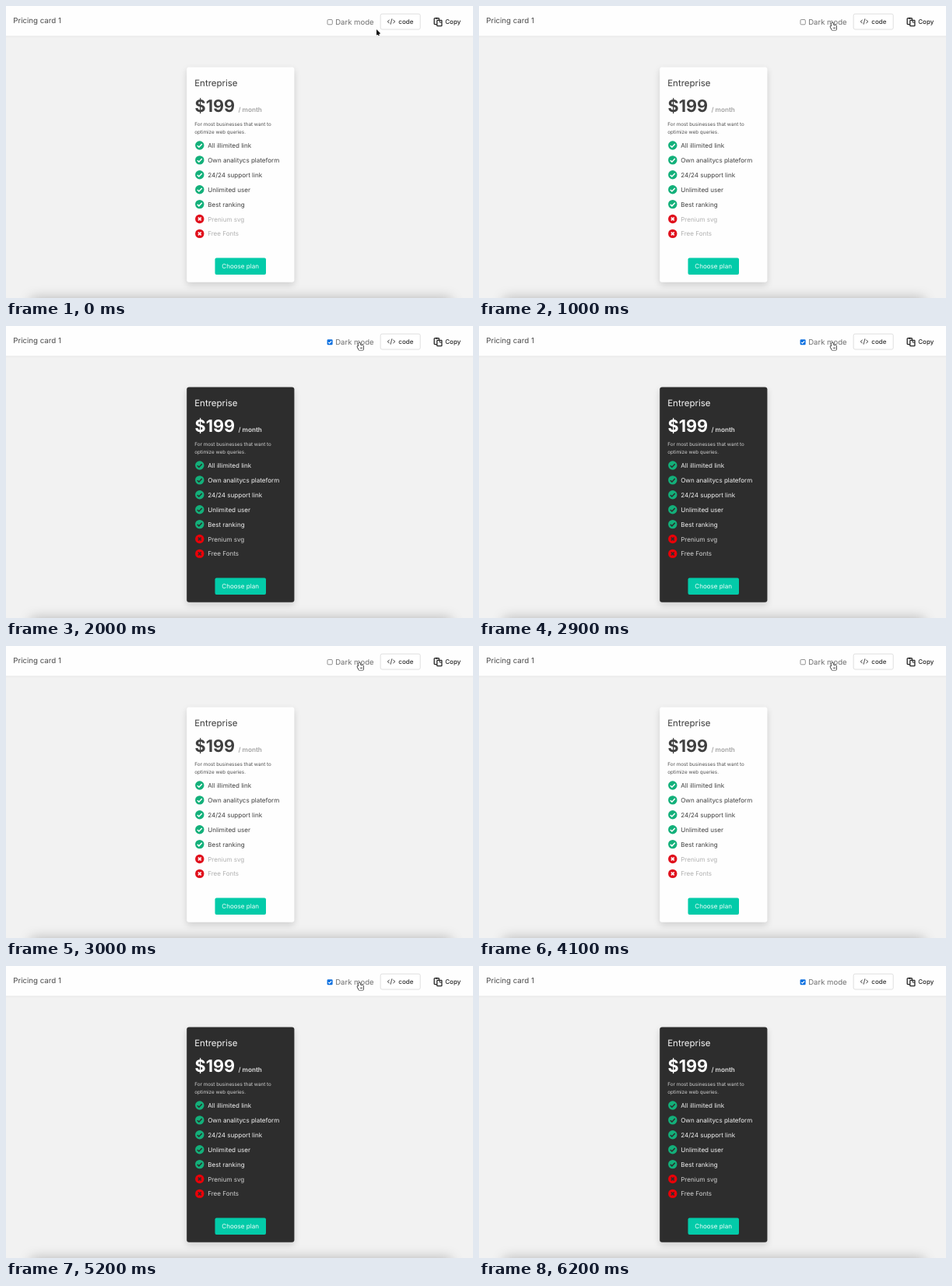
An HTML page with a canvas for the animation above (6.3 s loop, 600x375 px).

```html
<!DOCTYPE html>
<html lang="en">
<head>
<meta charset="utf-8">
<title>Pricing card</title>
<style>
html, body { margin: 0; width: 100%; height: 100%; overflow: hidden; background: #f2f2f2; }
canvas { display: block; width: 600px; height: 375px; }
</style>
</head>
<body>
<canvas id="stage"></canvas>
<script>
const LOOP = 6300, STEP = 100;
const TOGGLES = [1100, 3000, 5200];
const LEAVE = 5500;

const canvas = document.getElementById('stage');
const ctx = canvas.getContext('2d');
const dpr = window.devicePixelRatio || 1;
canvas.width = 600 * dpr;
canvas.height = 375 * dpr;

const light = {
  card: '#fefefe', title: '#3b3b3b', price: '#404040', unit: '#a3a3a3',
  note: '#505050', item: '#404040', off: '#b0b0b0', no: '#e0101c'
};
const dark = {
  card: '#2d2d2d', title: '#f6f6f6', price: '#fff', unit: '#dedede',
  note: '#d0d0d0', item: '#f2f2f2', off: '#d0d0d0', no: '#e90008'
};
const perks = ['All illimited link', 'Own analitycs plateform',
  '24/24 support link', 'Unlimited user', 'Best ranking'];
const missing = ['Prenium svg', 'Free Fonts'];

const ease = u => {
  const k = Math.min(1, Math.max(0, u));
  return k * k * (3 - 2 * k);
};

function text(str, x, y, size, color, weight = 400) {
  ctx.font = `${weight} ${size}px Inter, "Open Sans", sans-serif`;
  ctx.textRendering = 'geometricPrecision';
  ctx.fillStyle = color;
  ctx.fillText(str, x, y);
}

function box(x, y, w, h, r, fill, stroke, width = 0.8) {
  ctx.beginPath();
  ctx.roundRect(x, y, w, h, r);
  ctx.fillStyle = fill;
  ctx.fill();
  if (!stroke) return;
  ctx.strokeStyle = stroke;
  ctx.lineWidth = width;
  ctx.stroke();
}

function line(color, width, ...points) {
  ctx.strokeStyle = color;
  ctx.lineWidth = width;
  ctx.beginPath();
  for (const [x, y] of points) ctx.lineTo(x, y);
  ctx.stroke();
}

// runs a drawing with its own origin and state
function at(x, y, paint) {
  ctx.save();
  ctx.translate(x, y);
  paint();
  ctx.restore();
}

function shadow(color, blur, dy) {
  ctx.shadowColor = color;
  ctx.shadowBlur = blur * dpr;
  ctx.shadowOffsetY = dy * dpr;
}

function tick(x, y, s, color, width) {
  line(color, width, [x - s, y + s * 0.1], [x - s * 0.3, y + s * 0.75], [x + s, y - s * 0.6]);
}

function cross(x, y, s, color, width) {
  for (const d of [-s, s]) line(color, width, [x - s, y - d], [x + s, y + d]);
}

function background() {
  ctx.fillStyle = '#f2f2f2';
  ctx.fillRect(0, 0, 600, 375);
  at(0, 0, () => {
    shadow('rgba(0,0,0,.26)', 16, 0);
    box(32, 375, 540, 20, 4, '#ddd');
    shadow('rgba(0,0,0,.1)', 3, 0.5);
    box(-10, -10, 620, 48.5, 0, '#fefefe');
  });
}

function codeIcon() {
  const ink = '#3a3a3a';
  for (const side of [-1, 1]) {
    line(ink, 1, [side * 2.4, -2.3], [side * 4.6, 0], [side * 2.4, 2.3]);
  }
  line(ink, 0.9, [0.9, -3.7], [-0.9, 3.7]);
}

function copyIcon() {
  const ink = '#262626';
  box(0, 0, 6.2, 7.9, 0.8, '#fefefe', ink, 1.3);
  box(1.7, -1, 2.8, 2, 0.8, ink);
  box(3.6, 2.6, 6.1, 7.3, 0.6, '#fefefe', ink, 1.3);
  line(ink, 1, [6.9, 2.6], [6.9, 5.3], [9.7, 5.3]);
}

function header(isDark) {
  text('Pricing card 1', 9.2, 21.8, 9.7, '#4a4a4a');
  if (isDark) {
    box(412.6, 17.2, 7, 7, 1.2, '#0b6fe0');
    tick(416.1, 20.7, 2, '#fff', 1.1);
  } else {
    box(413, 17.5, 6.3, 6.3, 1.2, '#fff', '#777');
  }
  text('Dark mode', 423.2, 23.9, 9.55, '#707070');
  box(481.2, 10.2, 51, 19.8, 2, '#fff', '#d9d9d9');
  at(495, 20, codeIcon);
  text('code', 504.3, 23, 8.05, '#363636', 500);
  at(550.2, 15.7, copyIcon);
  text('Copy', 564.2, 23, 8, '#262626', 500);
}

function row(label, i, c) {
  const x = 248.8, y = 179 + i * 18.9, ok = i < perks.length;
  ctx.fillStyle = ok ? '#13b07a' : c.no;
  ctx.beginPath();
  ctx.arc(x, y, 5.7, 0, 2 * Math.PI);
  ctx.fill();
  if (ok) tick(x, y, 3, c.card, 1.5);
  else cross(x, y, 1.9, c.card, 1.7);
  text(label, 259.2, y + 3, 8.05, ok ? c.item : c.off);
}

function card(c) {
  at(0, 0, () => {
    shadow('rgba(10,10,10,.15)', 9, 3.5);
    box(232.2, 78.6, 138.2, 276.2, 3, c.card);
  });
  text('Entreprise', 242.2, 102.8, 11.5, c.title);
  text('$199', 242.6, 135.6, 21.6, c.price, 700);
  text('/ month', 298.4, 135.5, 8.2, c.unit, 600);
  text('For most businesses that want to', 242.2, 154.4, 6.33, c.note);
  text('optimize web queries.', 242.2, 163.5, 6.33, c.note);
  [...perks, ...missing].forEach((label, i) => row(label, i, c));
  box(268.5, 323.6, 65.5, 21.4, 2, '#03cba9');
  text('Choose plan', 277.3, 337.4, 8.05, '#f1fffb');
}

function arrow() {
  const head = new Path2D('M0 0V7.4L5.2 5.2Z');
  ctx.strokeStyle = '#fff';
  ctx.lineWidth = 1;
  ctx.stroke(head);
  ctx.fillStyle = '#111';
  ctx.fill(head);
  line('#111', 1.4, [1.6, 4.5], [3.2, 8]);
}

function hand() {
  const shape = new Path2D();
  shape.roundRect(-1, 0, 2, 7, 1);
  for (let i = 1; i < 4; i++) shape.roundRect(i * 1.4 - 1, 2.4 + i * 0.4, 1.9, 4, 0.9);
  shape.roundRect(-1, 4.6, 6.1, 4.8, 1.5);
  shape.ellipse(-1.2, 6, 0.9, 2.1, -0.6, 0, 2 * Math.PI);
  ctx.strokeStyle = '#222';
  ctx.lineWidth = 1.4;
  ctx.stroke(shape);
  ctx.fillStyle = '#fff';
  ctx.fill(shape);
  for (let i = 1; i < 4; i++) line('#333', 0.55, [i * 1.25, 5.8], [i * 1.25, 8]);
}

function cursor(t) {
  if (t >= LEAVE + STEP) return;
  const reach = ease(t / 300), settle = ease((t - 400) / 200);
  const leaving = t >= LEAVE;
  const x = 476 - 20 * reach - 2 * settle;
  const y = 30 - 8.5 * reach - (leaving ? 15 : 0);
  ctx.lineJoin = 'round';
  at(x, y, t < 200 || leaving ? arrow : hand);
  ctx.lineJoin = 'miter';
}

function draw(t) {
  const isDark = TOGGLES.filter(time => time <= t).length % 2 === 1;
  ctx.setTransform(dpr, 0, 0, dpr, 0, 0);
  background();
  header(isDark);
  card(isDark ? dark : light);
  cursor(t);
}

const start = performance.now();
function frame() {
  const t = (performance.now() - start) % LOOP;
  draw(Math.floor(t / STEP) * STEP);
  requestAnimationFrame(frame);
}
frame();
</script>
</body>
</html>
```
